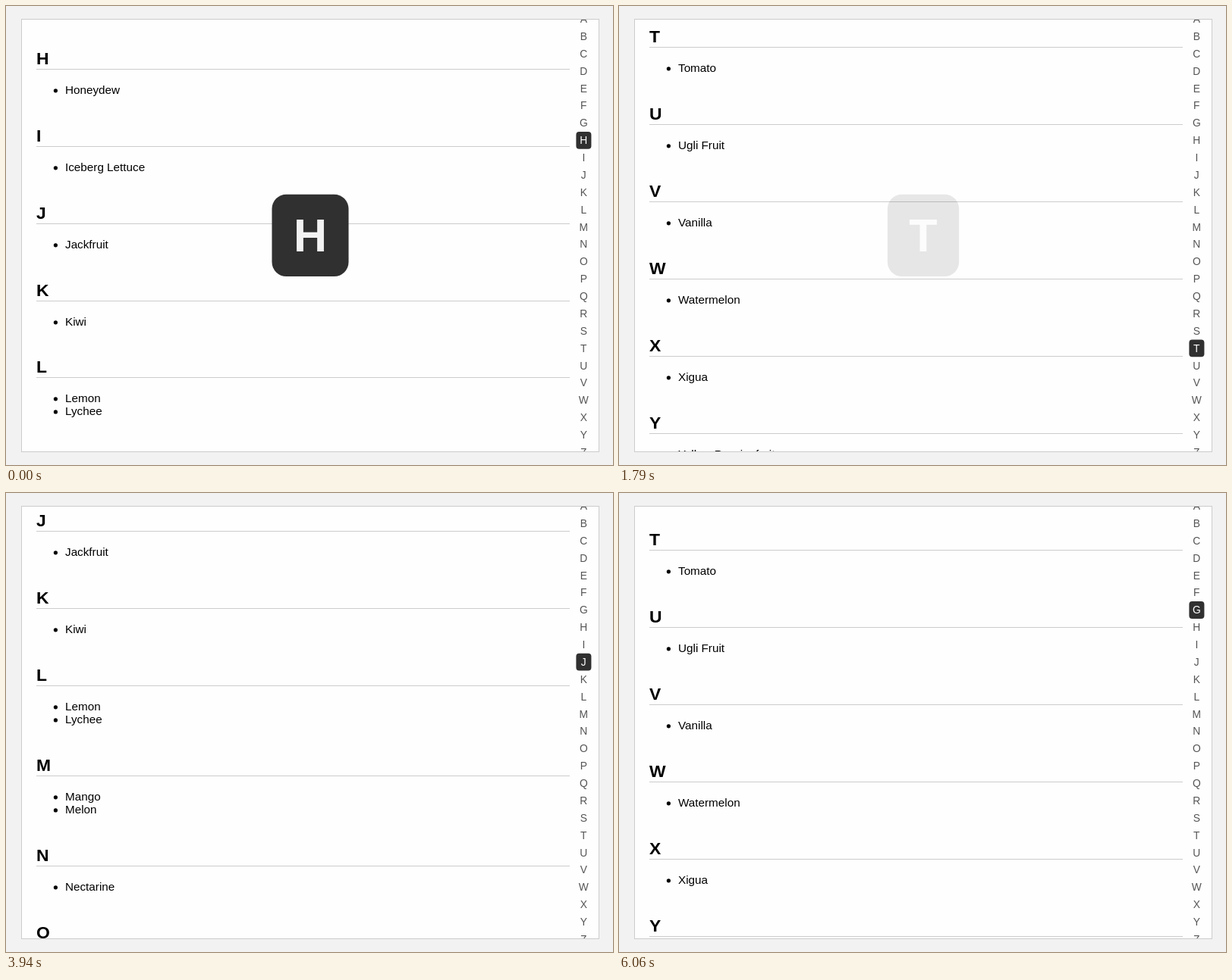
An HTML page that plays this animation: 800x606 px, repeating every 7270 ms.

```html
<!DOCTYPE html>
<html lang="en">
<head>
<meta charset="utf-8">
<title>Alphabet index</title>
<style>
  html, body { margin: 0; width: 100%; height: 100%; overflow: hidden; background: #f2f2f2; }
  svg { display: block; width: 800px; height: 606px; font-family: "Liberation Sans", Arial, sans-serif; }
  .head { font-size: 22.9px; font-weight: bold; }
  .item { font-size: 15.25px; }
  .key { font-size: 13.8px; text-anchor: middle; }
  .big { font-size: 61px; font-weight: bold; text-anchor: middle; fill: #f2f2f2; }
</style>
</head>
<body>
<svg viewBox="0 0 800 606">
  <clipPath id="view"><rect x="21" y="18" width="760" height="570"/></clipPath>
  <rect x="20.5" y="17.5" width="761" height="571" fill="#fefefe" stroke="#ccc"/>
  <g clip-path="url(#view)">
    <g id="list"></g>
    <g id="rail"></g>
  </g>
  <g id="popup">
    <rect id="card" y="248.8" height="108.3" rx="19" fill="#303030"/>
    <text id="letter" class="big" x="401" y="324"></text>
  </g>
</svg>
<script>
(() => {
const LOOP = 7270, REST = 54, SECTION = 101.9, ROW = 17.15;
const FOODS = {
  G: ['Grapes'], H: ['Honeydew'], I: ['Iceberg Lettuce'], J: ['Jackfruit'], K: ['Kiwi'],
  L: ['Lemon', 'Lychee'], M: ['Mango', 'Melon'], N: ['Nectarine'], O: ['Orange'],
  P: ['Papaya', 'Peach', 'Pineapple'], Q: ['Quince'], R: ['Raspberry'], S: ['Strawberry'],
  T: ['Tomato'], U: ['Ugli Fruit'], V: ['Vanilla'], W: ['Watermelon'], X: ['Xigua'],
  Y: ['Yellow Passionfruit']
};

// When each letter becomes the active one
const PICKS = [
  [0, 'H'], [110, 'I'], [220, 'J'], [320, 'K'], [400, 'L'], [465, 'M'], [527, 'N'], [588, 'O'],
  [690, 'P'], [770, 'Q'], [860, 'R'], [950, 'S'], [1050, 'T'],
  [2910, 'O'], [3610, 'J'], [4330, 'G']
];
// Scroll while dragging, relative to section H
const DRAG = [
  [0, -29], [200, 5], [420, 120], [640, 302], [850, 505], [1060, 755],
  [1270, 1123], [1360, 1243], [1450, 1290], [1530, 1292]
];
const HOLD = 85;
const POPUP = [[1700, 0]];
for (const [t] of PICKS.slice(-3)) POPUP.push([t, 1], [t + HOLD, 0]);

const $ = id => document.getElementById(id);
function add(parent, tag, attrs, text) {
  const el = document.createElementNS('http://www.w3.org/2000/svg', tag);
  for (const k in attrs) el.setAttribute(k, attrs[k]);
  if (text) el.textContent = text;
  return parent.appendChild(el);
}

function bezier(x1, y1, x2, y2) {
  const at = (a, b, s) => 3 * (1 - s) * (1 - s) * s * a + 3 * (1 - s) * s * s * b + s * s * s;
  return x => {
    if (x <= 0) return 0;
    if (x >= 1) return 1;
    let lo = 0, hi = 1;
    for (let i = 0; i < 24; i++) {
      const mid = (lo + hi) / 2;
      if (at(x1, x2, mid) < x) lo = mid; else hi = mid;
    }
    return at(y1, y2, lo);
  };
}
const ease = bezier(.25, .1, .25, 1);
const glide = bezier(.2, .3, .2, 1);

// Value of an interruptible transition at time t
function level(start, events, dur, t) {
  let from = start, to = start, t0 = 0;
  const value = now => from + (to - from) * ease((now - t0) / dur);
  for (const [when, goal] of events) {
    if (when > t) break;
    from = value(when);
    to = goal;
    t0 = when;
  }
  return value(t);
}

// Smooth curve through [time, value] points
function curve(pts, t) {
  const last = pts.length - 1;
  if (t >= pts[last][0]) return pts[last][1];
  let i = 0;
  while (t >= pts[i + 1][0]) i++;
  const slope = k => {
    const a = pts[Math.max(k - 1, 0)], b = pts[Math.min(k + 1, last)];
    return k === last ? 0 : (b[1] - a[1]) / (b[0] - a[0]);
  };
  const [ta, a] = pts[i], [tb, b] = pts[i + 1], h = tb - ta, u = (t - ta) / h;
  return a + u * u * (3 - 2 * u) * (b - a)
    + h * u * (1 - u) * ((1 - u) * slope(i) - u * slope(i + 1));
}

const pos = {};
const sections = [];
let offset = 0;
for (const [name, foods] of Object.entries(FOODS)) {
  const g = add($('list'), 'g', {});
  add(g, 'text', { class: 'head', x: 40, y: -6 }, name);
  add(g, 'rect', { x: 40, y: 0, width: 703, height: 1, fill: '#ccc' });
  foods.forEach((food, i) => {
    add(g, 'circle', { cx: 65.4, cy: 28.8 + i * ROW, r: 2.6 });
    add(g, 'text', { class: 'item', x: 78, y: 33.3 + i * ROW }, food);
  });
  pos[name] = offset;
  sections.push({ g, y: offset });
  offset += SECTION + (foods.length - 1) * ROW;
}

const keys = [...'ABCDEFGHIJKLMNOPQRSTUVWXYZ'].map((name, i) => {
  const y = 17.3 + i * 22.87;
  const box = add($('rail'), 'rect', { x: 751.4, y: y - 11.4, width: 20, height: 22.87, fill: '#303030' });
  const label = add($('rail'), 'text', { class: 'key', x: 761.3, y: y + 4.8 }, name);
  const events = [];
  PICKS.forEach(([t, pick], k) => {
    if (pick === name) events.push([t, 1]);
    else if (k && PICKS[k - 1][1] === name) events.push([t, 0]);
  });
  return { name, box, label, events };
});

const middle = (pos.G + pos.T - 21) / 2;
const MOVES = [
  [2910, 440, pos.T, pos.O], [3610, 380, pos.O, pos.J], [4330, 300, pos.J, pos.G],
  [4970, 360, pos.G, middle], [5670, 390, middle, pos.T - 21]
];

function scrollAt(t) {
  if (t < 1530) return pos.H + curve(DRAG, t) * (pos.T - pos.H) / 1292;
  let y = pos.T;
  for (const [t0, dur, a, b] of MOVES) if (t >= t0) y = a + (b - a) * glide((t - t0) / dur);
  return y;
}

function draw(t) {
  const scrolled = scrollAt(t);
  for (const s of sections)
    s.g.setAttribute('transform', `translate(0 ${Math.round(REST + s.y - scrolled)})`);

  const active = PICKS.filter(p => p[0] <= t).pop()[1];
  for (const k of keys) {
    const on = k.name === active;
    k.box.setAttribute('opacity', level(k.name === 'H' ? 1 : 0, k.events, 200, t));
    k.box.setAttribute('rx', on ? 4 : 0);
    k.label.setAttribute('fill', on ? '#fff' : '#555');
  }

  $('letter').textContent = active;
  const w = $('letter').getComputedTextLength() + 57;
  $('card').setAttribute('x', 401 - w / 2);
  $('card').setAttribute('width', w);
  $('popup').setAttribute('opacity', level(1, POPUP, 150, t));
}

const begin = performance.now();
function tick() {
  draw(Math.max(0, performance.now() - begin) % LOOP);
  requestAnimationFrame(tick);
}
tick();
})();
</script>
</body>
</html>
```
